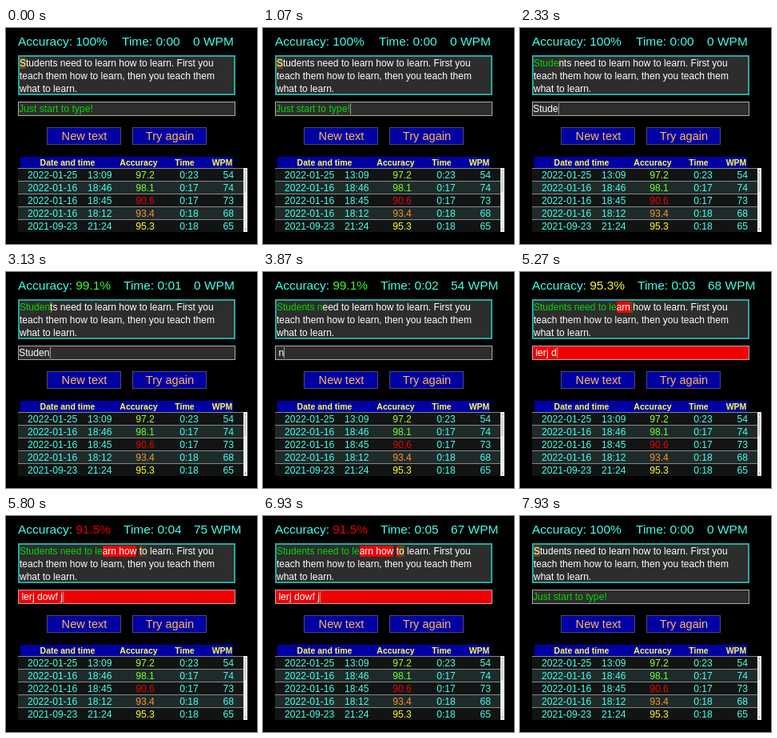
Animation, 314 px wide and 270 px high, one loop 8 s. Source, as an HTML page:

```html
<!DOCTYPE html>
<html lang="en">
<head>
<meta charset="utf-8">
<title>Typing practice</title>
<style>
  html, body { margin: 0; width: 100%; height: 100%; overflow: hidden; background: #000; }
  #stage { position: absolute; left: 0; top: 0; width: 314px; height: 270px; overflow: hidden;
    font: 12px/16px "Liberation Sans", Arial, sans-serif; }
  #stage div { position: absolute; box-sizing: border-box; white-space: pre; }
  #caret { display: inline-block; width: 1px; height: 14px; background: #999; vertical-align: -3px; }
</style>
</head>
<body>
<div id="stage"></div>
<script>
const LOOP = 8000, START = 1730, RESET = 7200, FADE = 120;
const CYAN = "#40ffe8", DARK = "#2d2d2d", RED = "#f00000", GREEN = "#00d800", OLIVE = "#5f4d0c";
const LINES = ["Students need to learn how to learn. First you ",
  "teach them how to learn, then you teach them ", "what to learn."];
const TEXT = LINES.join("");
const WPM = [0, 0, 54, 68, 75, 67];

// [first key, gap between keys, keys]; "<" is backspace
const TYPING = [[START, 140, "Stude"], [2450, 0, "m"], [2800, 0, "<"], [3000, 0, "n"],
  [3400, 165, "ts "], [3850, 100, "need to "], [4760, 100, "lerj dowf j"]];
const KEYS = TYPING.flatMap(([at, gap, keys]) => [...keys].map((key, i) => ({ at: at + i * gap, key })));

const ROWS = [
  ["2022-01-25", "13:09", 97.2, "0:23", 54],
  ["2022-01-16", "18:46", 98.1, "0:17", 74],
  ["2022-01-16", "18:45", 90.6, "0:17", 73],
  ["2022-01-16", "18:12", 93.4, "0:18", 68],
  ["2021-09-23", "21:24", 95.3, "0:18", 65]];

const stage = document.getElementById("stage");

function box(x, y, w, h, fill, border = "0") {
  const el = document.createElement("div");
  el.style.cssText = `left:${x}px;top:${y}px;width:${w}px;height:${h}px;background:${fill};border:${border}`;
  return stage.appendChild(el);
}

// Text centred vertically on cy; align is 0 (left), 0.5 (centre) or 1 (right)
function label(text, x, cy, { size = 12.2, color = CYAN, align = 0, weight = 400 } = {}) {
  const el = document.createElement("div");
  el.textContent = text;
  el.style.cssText = `left:${x}px;top:${cy - 10}px;line-height:20px;font-size:${size}px;color:${color};` +
    `font-weight:${weight};transform:translateX(${-100 * align}%)`;
  return stage.appendChild(el);
}

function accuracyColor(acc) {
  if (acc >= 100) return CYAN;
  const hue = Math.max(0, (acc - 91.5) * 15.3);
  return `hsl(${hue} 100% ${acc < 92 ? 45 : 58}%)`;
}

const big = { size: 15.5 };
label("Accuracy: ", 15, 17, big);
const accuracy = label("", 87.2, 17, big);
const time = label("", 145, 17, big);
const wpm = label("", 234, 17, big);

box(15, 34, 272, 50, DARK, "2px solid #24a8a0");
const chars = LINES.flatMap((line, row) => {
  const el = label("", 17, 44 + row * 16, { size: 12, color: "#fff" });
  return [...line].map(c => {
    const span = document.createElement("span");
    span.textContent = c;
    return el.appendChild(span);
  });
});

const field = box(15, 92, 272, 18, DARK, "1px solid #aaa");
const typed = label("", 16, 101);
const value = typed.appendChild(document.createElement("span"));
const caret = typed.appendChild(document.createElement("span"));
caret.id = "caret";

for (const [text, x] of [["New text", 51], ["Try again", 158]]) {
  box(x, 124, 93, 22, "#0000a4", "1px solid #4a4a6a");
  label(text, x + 47, 135, { size: 14.6, color: "#ffb94f", align: .5 });
}

box(18, 161, 266, 14, "#0000a4");
for (const [text, x] of [["Date and time", 77], ["Accuracy", 166], ["Time", 223.5], ["WPM", 270.5]])
  label(text, x, 168, { size: 10.5, color: "#ff4", align: .5, weight: 700 });

box(15, 175, 282, 80, "#888");
ROWS.forEach(([date, clock, acc, span, speed], i) => {
  const y = 176 + i * 16, cy = y + 8;
  box(15, y, 282, 15, i % 2 ? "#1f2b2b" : "#121414");
  label(date, 27, cy);
  label(clock, 102, cy);
  label(acc.toFixed(1), 174, cy, { color: accuracyColor(acc), align: .5 });
  label(span, 229, cy, { align: .5 });
  label(speed, 285, cy, { align: 1 });
});
box(297, 175, 5, 80, "#eee");
box(298, 181, 3, 24, "#d4d4d4");
box(299, 178, 1, 1, "#444");
box(299, 251, 1, 1, "#444");

function stateAt(t) {
  const s = { all: "", input: "", errors: 0, wrong: false, lastKey: -970 };
  if (t >= RESET) return { ...s, lastKey: RESET };
  for (const { at, key } of KEYS) {
    if (at > t) break;
    s.lastKey = at;
    if (key === "<") {
      s.all = s.all.slice(0, -1);
      s.input = s.input.slice(0, -1);
    } else {
      // a finished word leaves the field when the next one begins
      if (!s.wrong && s.input.length > 1 && s.input.endsWith(" ")) s.input = " ";
      if (key !== TEXT[s.all.length]) s.errors++;
      s.all += key;
      s.input += key;
    }
    s.wrong = !TEXT.startsWith(s.all);
  }
  return s;
}

function paintChars(all, fade) {
  const n = all.length, percent = fade * 100;
  chars.forEach((el, i) => {
    const right = i < n && all[i] === TEXT[i];
    let fill = i < n && !right ? RED : "transparent";
    // the marker fades in on the next letter and out of the one just typed
    if (i === n) fill = `color-mix(in srgb, ${OLIVE} ${percent}%, ${DARK})`;
    else if (i === n - 1 && !right) fill = `color-mix(in srgb, ${RED} ${percent}%, ${OLIVE})`;
    el.style.background = fill;
    el.style.color = right ? GREEN : "#fff";
  });
}

function draw(t) {
  const s = stateAt(t), n = s.all.length;
  const acc = 100 * (1 - s.errors / TEXT.length);
  const sec = t >= START && t < RESET ? Math.floor((t - START) / 1000) : 0;
  const shift = s.errors ? 1 : 0;

  accuracy.textContent = (s.errors ? acc.toFixed(1) : "100") + "%";
  accuracy.style.color = accuracyColor(acc);
  time.textContent = "Time: 0:0" + sec;
  time.style.left = 145 + 2 * shift + "px";
  wpm.textContent = WPM[sec] + " WPM";
  wpm.style.left = 234 + shift + "px";

  paintChars(s.all, Math.min(1, (t - s.lastKey) / FADE));
  value.textContent = n ? s.input : "Just start to type!";
  typed.style.color = n ? "#fff" : GREEN;
  field.style.background = s.wrong ? RED : DARK;
  caret.style.visibility = (t - s.lastKey) % 1000 < 500 ? "visible" : "hidden";
}

const origin = performance.now();
function tick() {
  draw((performance.now() - origin) % LOOP);
  requestAnimationFrame(tick);
}
draw(0);
requestAnimationFrame(tick);
</script>
</body>
</html>
```
